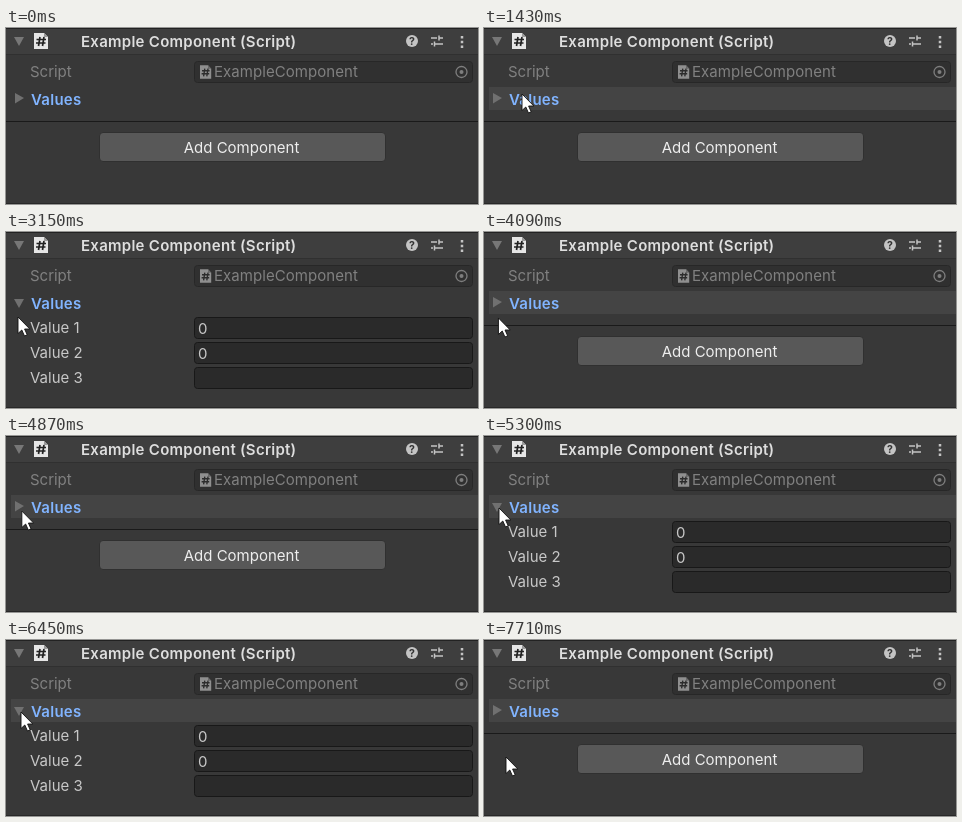
An HTML page for the animation above (7760 ms loop, 472x176 px).

```html
<!DOCTYPE html>
<html lang="en">
<meta charset="utf-8">
<title>Foldout</title>
<style>
  html, body { margin: 0; width: 100%; height: 100%; overflow: hidden; background: #383838; }
  svg { display: block; width: 472px; height: 176px; }
  text { font: 15px Inter, Roboto, sans-serif; fill: #c8c8c8; }
  .b { font-weight: 600; letter-spacing: .27px; }
  .field { fill: #2a2a2a; stroke: #181818; }
  .dim { opacity: .5; }
</style>
<svg viewBox="0 0 472 176">
  <rect width="472" height="176" fill="#383838"/>
  <rect width="472" height="26" fill="#3e3e3e"/>
  <path d="M0 .5H472" stroke="#222"/>
  <path d="M0 26.5H472" stroke="#303030"/>
  <path d="M8 9H18L13 18Z" fill="#777"/>
  <g id="page">
    <path d="M28 5H38L42 9V21H28Z" fill="#e6e6e6"/>
    <path d="M38 5V9H42Z" fill="#999"/>
    <path d="M34 9L32.500 18M38 9L36.500 18M30.500 11.500H40M30 15H39.500" stroke="#222" stroke-width="1.700"/>
  </g>
  <text class="b" x="75" y="18.500" style="fill:#dedede">Example Component (Script)</text>
  <circle cx="406" cy="13" r="6" fill="#c4c4c4"/>
  <text x="406" y="17" text-anchor="middle" style="font-size:10.500px;font-weight:700;fill:#333">?</text>
  <path d="M425 10H431M433 10H437M425 16H427M429 16H437M433 7.500V12.500M428.500 13.500V18.500" stroke="#c4c4c4" stroke-width="1.500"/>
  <path d="M456 8V20" stroke="#c4c4c4" stroke-width="2.500" stroke-dasharray="2.500 2.300"/>

  <g class="dim">
    <text x="24" y="49">Script</text>
    <rect class="field" x="188.500" y="33.500" width="278" height="21" rx="3"/>
    <use href="#page" transform="translate(171.600 33) scale(.8 .85)"/>
    <text x="208" y="49" letter-spacing=".06">ExampleComponent</text>
    <circle cx="455.500" cy="44" r="5.500" fill="none" stroke="#c4c4c4" stroke-width="1.300"/>
    <circle cx="455.500" cy="44" r="2" fill="#c4c4c4"/>
  </g>

  <rect id="hover" x="5" y="59" width="467" height="23" fill="#444"/>
  <path id="arrow" fill="#707070"/>
  <text class="b" x="25" y="77" style="fill:#81b4ff">Values</text>

  <g id="closed">
    <path d="M0 93.500H472" stroke="#1a1a1a"/>
    <rect x="93.500" y="104.500" width="286" height="29" rx="3.500" fill="#585858" stroke="#303030"/>
    <text x="235.500" y="125" text-anchor="middle" style="fill:#eee">Add Component</text>
  </g>
  <g id="open"></g>
  <path d="M0 175.500H472" stroke="#282828"/>

  <circle id="click" r="15" fill="#dcd41c" opacity=".8"/>
  <path id="cursor" d="M0 0V16.500L3.800 13L6.500 19L9.200 17.800L6.600 12H11.800Z" fill="#fff" stroke="#111" stroke-width=".9"/>
</svg>
<script>
const LOOP = 7760, HOLD = 120, TOGGLE = 140, LAG = 100;
const $ = id => document.getElementById(id);
const show = (id, on) => $(id).setAttribute('visibility', on ? 'visible' : 'hidden');

$('open').innerHTML = [1, 2, 3].map(n => {
  const y = 60 + 25 * n;
  return `<text x="24" y="${y + 16}">Value ${n}</text>
    <rect class="field" x="188.500" y="${y + .5}" width="278" height="21" rx="3"/>
    <text x="192" y="${y + 17}">${n < 3 ? 0 : ''}</text>`;
}).join('');

// Each press flashes a disc, then flips the foldout
const presses = [1310, 2020, 2720, 3750, 5160, 5760, 6310, 7230];

// Pointer moves: start, duration, and where it lands
const moves = [
  [740, 410, 38, 66], [2860, 290, 12, 85], [3330, 140, 10, 76],
  [4040, 340, 26, 112], [4480, 540, 15, 72], [7610, 100, 22, 117]
];

function pointer(t) {
  return moves.reduce(([x, y], [start, length, toX, toY]) => {
    const k = Math.min(1, Math.max(0, (t - start) / length)), e = k * (2 - k);
    return [x + (toX - x) * e, y + (toY - y) * e];
  }, [24, 180]);
}

function draw(now) {
  const t = now % LOOP, [x, y] = pointer(t);
  const isOpen = presses.filter(p => t >= p + TOGGLE).length % 2 === 1;
  show('click', presses.some(p => t >= p && t < p + HOLD));
  show('hover', pointer(t - LAG)[1] < 82);
  show('open', isOpen);
  show('closed', !isOpen);
  $('arrow').setAttribute('d', isOpen ? 'M8 67H18L13 76Z' : 'M9 65V75.500L18 70Z');
  $('cursor').setAttribute('transform', `translate(${x} ${y})`);
  $('click').setAttribute('cx', x - .8);
  $('click').setAttribute('cy', y);
  requestAnimationFrame(draw);
}
requestAnimationFrame(draw);
</script>
</html>
```
